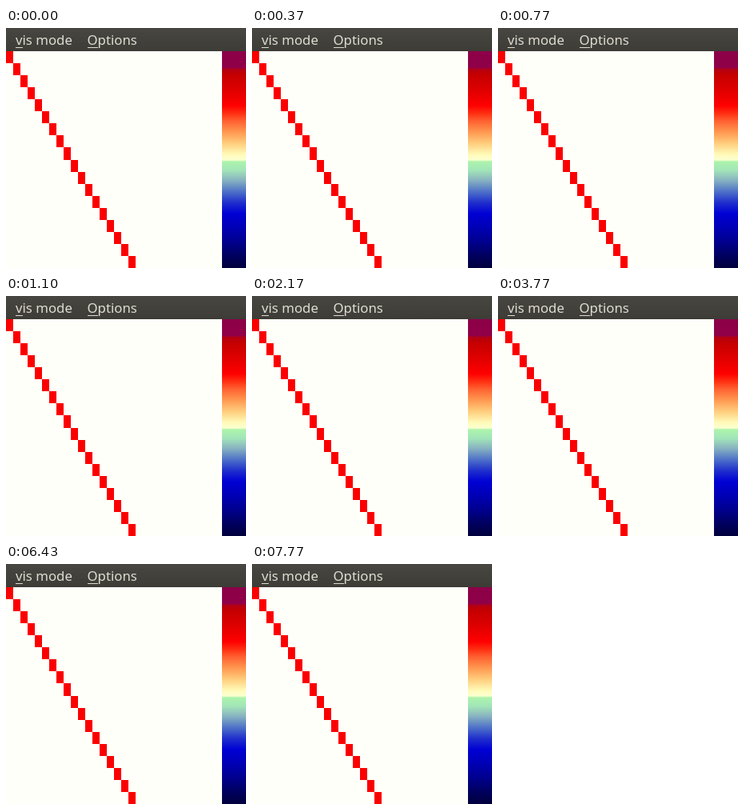
Write an HTML page that moves like this. It is 300 by 300 pixels and loops after 8 s.

```html
<!DOCTYPE html>
<html lang="en">
<head>
<meta charset="utf-8">
<title>Matrix view</title>
<style>
  html, body { margin: 0; width: 100%; height: 100%; overflow: hidden; background: #fffffa; }
  svg { display: block; width: 100vw; height: 100vh; }
  text { font: 16.8px "Noto Sans", "Open Sans", sans-serif; fill: #dfdbd2; }
</style>
</head>
<body>
<svg viewBox="0 0 300 300">
  <defs>
    <linearGradient id="menu" x2="0" y2="1">
      <stop stop-color="#474640"/>
      <stop offset="1" stop-color="#3d3c36"/>
    </linearGradient>
    <linearGradient id="scale" gradientUnits="userSpaceOnUse" x1="0" y1="0" x2="0" y2="300"></linearGradient>
  </defs>
  <rect width="300" height="300" fill="#fffffa"/>
  <rect width="300" height="29" fill="url(#menu)"/>
  <text x="12" y="21">vis mode</text>
  <text x="101.5" y="21">Options</text>
  <path d="M12 24.5h9M102 24.5h13" stroke="#dfdbd2"/>
  <g id="cells" fill="#fa0000" shape-rendering="crispEdges"></g>
  <rect x="270" y="29" width="30" height="271" fill="url(#scale)"/>
</svg>
<script>
const NS = "http://www.w3.org/2000/svg";
const LOOP = 8000, TOP = 29, ROWS = 18, CELL_W = 9, CELL_H = 271 / ROWS;

// Colour scale: y position and colour
const stops = [
  [29, "#8c0048"], [50, "#900048"], [51, "#b00018"], [58, "#c40000"],
  [75, "#dc0000"], [97, "#ff0000"], [106, "#ff2c10"], [116, "#ff6030"],
  [130, "#ff9850"], [145, "#ffd080"], [158, "#fffab8"], [165, "#fbffd0"],
  [167, "#acf4ac"], [178, "#a2e4b8"], [190, "#88b4c0"], [204, "#5074c8"],
  [218, "#2030cc"], [232, "#0000d4"], [250, "#0000b4"], [268, "#00008c"],
  [284, "#000060"], [300, "#00003c"]
];

function add(parent, tag, attrs) {
  const el = document.createElementNS(NS, tag);
  for (const key in attrs) el.setAttribute(key, attrs[key]);
  return parent.appendChild(el);
}

const scale = document.getElementById("scale");
for (const [y, color] of stops) add(scale, "stop", { offset: y / 300, "stop-color": color });

const group = document.getElementById("cells");
const cells = Array.from({ length: ROWS }, () => add(group, "rect", { width: CELL_W }));

// The diagonal holds its pose through the whole loop.
function draw(time) {
  cells.forEach((cell, i) => {
    const y = Math.round(TOP + i * CELL_H);
    cell.setAttribute("x", i * CELL_W);
    cell.setAttribute("y", y);
    cell.setAttribute("height", Math.round(TOP + (i + 1) * CELL_H) - y);
  });
}

function tick(now) {
  draw(now % LOOP);
  requestAnimationFrame(tick);
}
draw(0);
requestAnimationFrame(tick);
</script>
</body>
</html>
```
